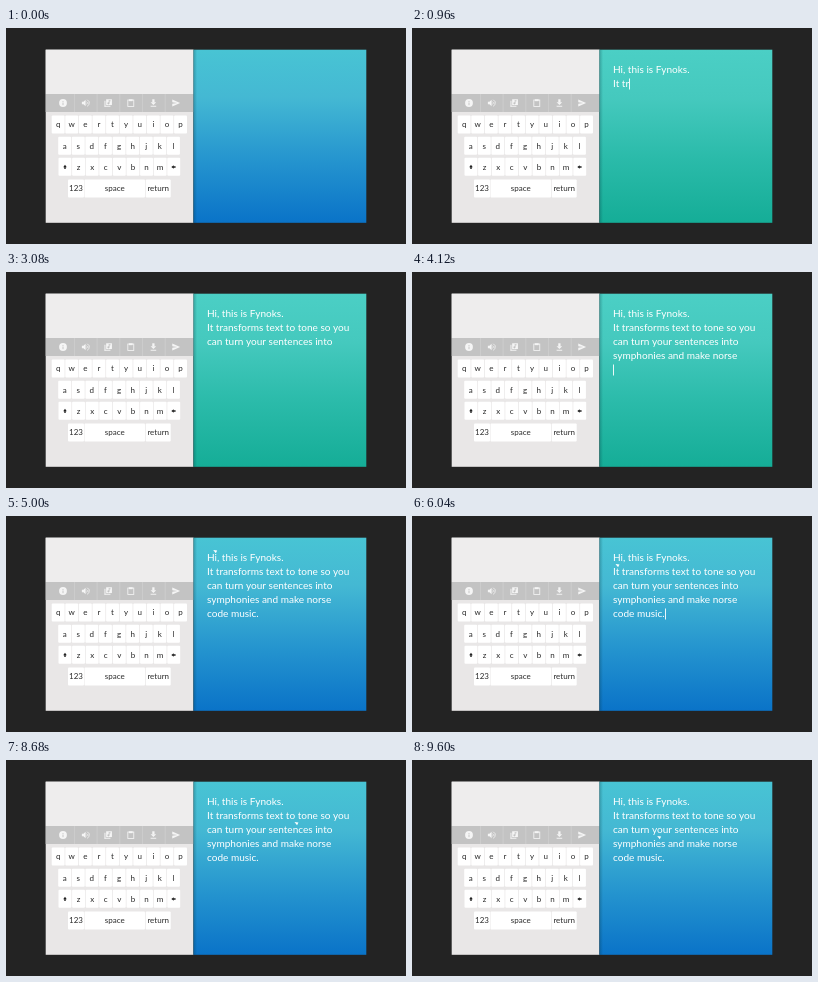
Write an HTML page with a canvas that moves like this. It is 400x216 px and loops after 9.64 s.

```html
<!DOCTYPE html>
<html lang="en">
<head>
<meta charset="utf-8">
<title>Text to tone</title>
<style>
html, body { margin: 0; width: 100%; height: 100%; overflow: hidden; background: #232323; }
canvas { display: block; width: 400px; height: 216px; }
</style>
</head>
<body>
<canvas id="stage" width="400" height="216"></canvas>
<script>
const ctx = document.getElementById('stage').getContext('2d');
const LOOP = 9640;
const LINES = [
  'Hi, this is Fynoks.',
  'It transforms text to tone so you',
  'can turn your sentences into',
  'symphonies and make norse',
  'code music.'
];
const TEXT = LINES.join('\n');
const TEXT_X = 201, BASELINE = 45, LEADING = 14;
const LEFT = 39.7, SPLIT = 187.5, RIGHT = 360.3, TOP = 21.7, BOTTOM = 194.8;
const TYPING = [[100, 0], [2000, 57], [2950, 82], [3150, 82], [4500, TEXT.length]];
const PLAY_START = 4949, PLAY_STEP = 51;
const BLUE = [[72, 196, 212], [68, 184, 211], [38, 150, 207], [10, 115, 200]];
const GREEN = [[75, 207, 197], [69, 201, 190], [43, 187, 170], [21, 173, 151]];
const STOPS = [0, 0.28, 0.62, 1];

const clamp = v => Math.min(1, Math.max(0, v));
const mix = (a, b, k) => a + (b - a) * k;
const smooth = (t, from, to) => {
  const k = clamp((t - from) / (to - from));
  return k * k * (3 - 2 * k);
};

function keyed(points, t) {
  if (t <= points[0][0]) return points[0][1];
  for (let i = 1; i < points.length; i++) {
    const [t0, v0] = points[i - 1], [t1, v1] = points[i];
    if (t < t1) return mix(v0, v1, (t - t0) / (t1 - t0));
  }
  return points[points.length - 1][1];
}

function rect(x, y, w, h, color) {
  ctx.fillStyle = color;
  ctx.fillRect(x, y, w, h);
}

function shape(points, color) {
  ctx.fillStyle = color;
  ctx.beginPath();
  points.forEach(([x, y]) => ctx.lineTo(x, y));
  ctx.fill();
}

function disc(x, y, r, color) {
  ctx.fillStyle = color;
  ctx.beginPath();
  ctx.arc(x, y, r, 0, Math.PI * 2);
  ctx.fill();
}

function key(x, y, w, label) {
  ctx.fillStyle = '#fff';
  ctx.beginPath();
  ctx.roundRect(x, y, w, 18, 1);
  ctx.fill();
  ctx.fillStyle = '#2a2a2a';
  ctx.fillText(label, x + w / 2, y + 11.8);
}

function arrow(x, y, angle) {
  ctx.save();
  ctx.translate(x, y);
  ctx.rotate(angle);
  shape([[0, -2.2], [1.8, 0.2], [0.7, 0.2], [0.7, 2.1], [-0.7, 2.1], [-0.7, 0.2], [-1.8, 0.2]], '#222');
  ctx.restore();
}

const BAR = '#c3c3c3', ICON = '#f5f5f5';
const ICONS = [
  () => {
    disc(0, 0, 4.2, ICON);
    rect(-0.5, -2.2, 1, 1, BAR);
    rect(-0.5, -0.5, 1, 2.8, BAR);
  },
  () => {
    shape([[-4, -1.3], [-2.3, -1.3], [0, -3.6], [0, 3.6], [-2.3, 1.3], [-4, 1.3]], ICON);
    ctx.beginPath();
    ctx.arc(0, 0, 1.8, -1, 1);
    ctx.moveTo(1.8, -3.4);
    ctx.arc(0, 0, 3.9, -1.1, 1.1);
    ctx.stroke();
  },
  () => {
    rect(-2.2, -4, 6.2, 6.2, ICON);
    rect(-4, -2.4, 1, 6.4, ICON);
    rect(-4, 3, 6.4, 1, ICON);
    disc(0.2, 0.4, 1.1, BAR);
    rect(0.6, -2.8, 0.8, 3.2, BAR);
    rect(0.6, -2.8, 2, 0.9, BAR);
  },
  () => {
    ctx.strokeRect(-3.2, -3.2, 6.4, 7);
    rect(-2, -4, 4, 2, ICON);
  },
  () => {
    rect(-1.2, -4, 2.4, 3.4, ICON);
    shape([[-3, -0.8], [3, -0.8], [0, 2.2]], ICON);
    rect(-3, 3, 6, 1, ICON);
  },
  () => shape([[-4, -3.7], [4.4, 0], [-4, 3.7], [-4, 0.8], [1.4, 0], [-4, -0.8]], ICON)
];

function drawKeyboard() {
  rect(LEFT, TOP, SPLIT - LEFT, BOTTOM - TOP, '#e9e7e7');
  rect(LEFT, TOP, SPLIT - LEFT, 66 - TOP, '#eeeded');
  rect(LEFT, 66, SPLIT - LEFT, 18, BAR);
  ICONS.forEach((icon, i) => {
    if (i) rect(45.3 + i * 22.7, 66, 0.8, 18, '#cfcfcf');
    ctx.save();
    ctx.translate(57 + i * 22.6, 75);
    ctx.scale(0.93, 0.93);
    ctx.strokeStyle = ICON;
    ctx.lineWidth = 0.9;
    icon();
    ctx.restore();
  });
  ctx.font = '8px Lato, sans-serif';
  ctx.textAlign = 'center';
  [['qwertyuiop', 45.7, 87.4], ['asdfghjkl', 52.2, 108.7], [' zxcvbnm ', 52.5, 129.8]].forEach(([row, x, y]) => {
    [...row].forEach((letter, i) => key(x + i * 13.6, y, 12.9, letter));
  });
  arrow(59, 139, 0);
  arrow(167.5, 139, -Math.PI / 2);
  key(62, 151.4, 16, '123');
  key(78.5, 151.4, 60.5, 'space');
  key(139.7, 151.4, 25, 'return');
}

function drawPanel(t) {
  const green = smooth(t, 150, 600) * (1 - smooth(t, 4550, 4900));
  const fill = ctx.createLinearGradient(0, TOP, 0, BOTTOM);
  STOPS.forEach((stop, i) => {
    const rgb = BLUE[i].map((v, c) => Math.round(mix(v, GREEN[i][c], green)));
    fill.addColorStop(stop, `rgb(${rgb})`);
  });
  rect(SPLIT, TOP, RIGHT - SPLIT, BOTTOM - TOP, fill);
  const shade = ctx.createLinearGradient(187, 0, 191, 0);
  shade.addColorStop(0, 'rgba(0,45,55,.3)');
  shade.addColorStop(1, 'rgba(0,45,55,0)');
  rect(187, TOP, 4, BOTTOM - TOP, shade);
}

// Line number and horizontal end of the first `count` characters.
function place(count) {
  const rows = TEXT.slice(0, count).split('\n');
  const row = rows.length - 1;
  return { row, x: TEXT_X + ctx.measureText(rows[row]).width };
}

function caretVisible(t) {
  if (t < 2950) return true;
  if (t < 3150) return false;
  if (t < 4500) return true;
  return (t - 20) % 1000 < 500;
}

function drawText(t) {
  const count = Math.floor(keyed(TYPING, t) + 1e-6);
  ctx.font = '10.05px Lato, sans-serif';
  ctx.textAlign = 'left';
  ctx.fillStyle = '#fff';
  TEXT.slice(0, count).split('\n').forEach((line, i) => {
    ctx.fillText(line, TEXT_X, BASELINE + i * LEADING);
  });
  if (count && caretVisible(t)) {
    const end = place(count);
    rect(Math.round(end.x), BASELINE + end.row * LEADING - 8.5, 0.9, 11, '#fff');
  }
  const index = Math.floor((t - PLAY_START) / PLAY_STEP);
  if (index >= 0 && /\S/.test(TEXT[index] || ' ')) {
    const { row, x } = place(index + 1);
    const y = BASELINE + row * LEADING - 11;
    shape([[x - 3.8, y], [x + 0.2, y + 0.6], [x - 1.2, y + 3.2]], '#fff');
  }
}

function draw(t) {
  rect(0, 0, 400, 216, '#232323');
  drawKeyboard();
  drawPanel(t);
  drawText(t);
}

const start = performance.now();
function tick() {
  draw((performance.now() - start) % LOOP);
  requestAnimationFrame(tick);
}
tick();
</script>
</body>
</html>
```
